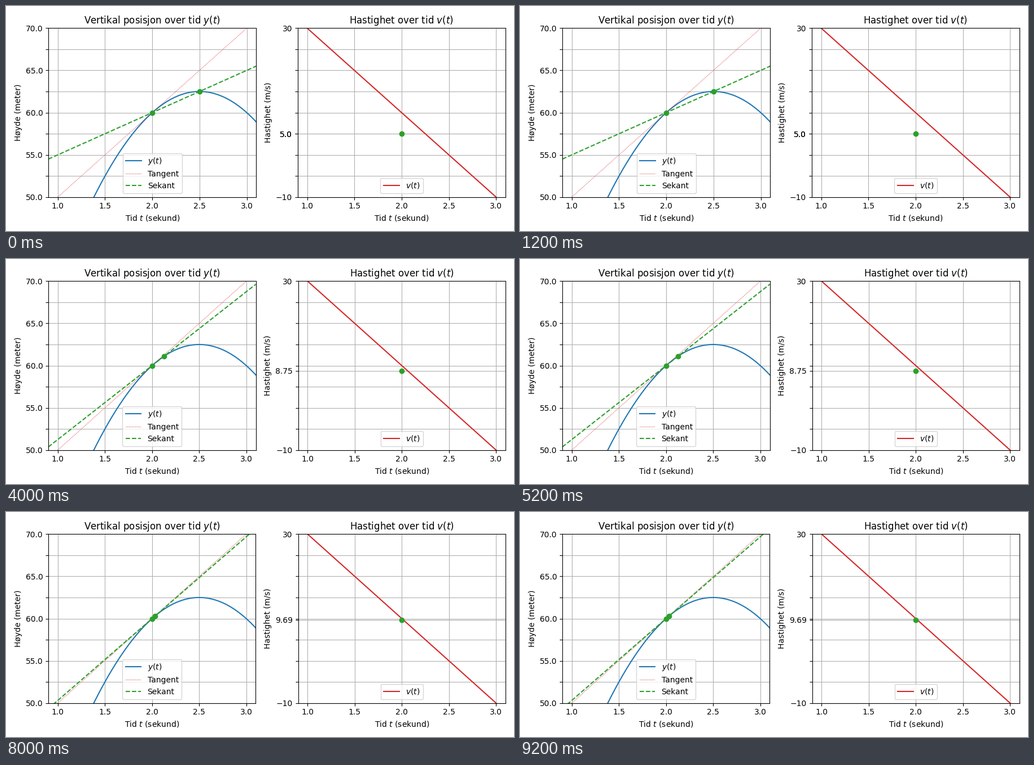
Write a matplotlib script that moves like this. It is 900 px wide and 400 px high and loops after 10 s.

```python
import numpy as np
import matplotlib.pyplot as plt
from matplotlib.animation import FuncAnimation

T0 = 2.0
T_MIN, T_MAX = 0.9, 3.1
V_MIN, V_MAX = -10, 30


def height(t):
    return 50 * t - 10 * t**2


def speed(t):
    return 50 - 20 * t


def setup(ax, title, ylabel, ylim):
    ax.set_title(title)
    ax.set_xlabel("Tid $t$ (sekund)")
    ax.set_ylabel(ylabel)
    ax.set_xlim(T_MIN, T_MAX)
    ax.set_ylim(*ylim)
    ax.set_xticks(np.arange(1, 3.1, 0.5))
    ax.grid(True)


fig, (pos, vel) = plt.subplots(1, 2, figsize=(9, 4), dpi=100)
ends = np.array([T_MIN, T_MAX])
t = np.linspace(T_MIN, T_MAX, 400)

# Position with tangent and secant
setup(pos, "Vertikal posisjon over tid $y(t)$", "Høyde (meter)", (50, 70))
y_ticks = np.arange(50, 70.1, 2.5)
pos.set_yticks(y_ticks, [f"{y:.1f}" if y % 5 == 0 else "" for y in y_ticks])
pos.plot(t, height(t), color="tab:blue", label="$y(t)$")
pos.plot(ends, height(T0) + speed(T0) * (ends - T0), ":", color="tab:red",
         lw=0.75, label="Tangent")
secant, = pos.plot([], [], "--", color="tab:green", label="Sekant")
points, = pos.plot([], [], "o", color="tab:green")
pos.legend(loc="lower center")

# Velocity
setup(vel, "Hastighet over tid $v(t)$", "Hastighet (m/s)", (V_MIN, V_MAX))
vel.plot(t, speed(t), color="tab:red", label="$v(t)$")
mean_dot, = vel.plot([], [], "o", color="tab:green")
vel.legend(loc="lower center")


def update(i):
    h = 0.5 / 2**i
    slope = (height(T0 + h) - height(T0)) / h
    secant.set_data(ends, height(T0) + slope * (ends - T0))
    points.set_data([T0, T0 + h], [height(T0), height(T0 + h)])
    mean_dot.set_data([T0], [slope])

    marks = {V_MIN: str(V_MIN).replace("-", "\u2212"), V_MAX: str(V_MAX),
             slope: str(round(slope, 2))}
    ticks = [*range(V_MIN, V_MAX + 1, 5), slope]
    vel.set_yticks(ticks, [marks.get(v, "") for v in ticks])
    fig.tight_layout()
    return secant, points, mean_dot


anim = FuncAnimation(fig, update, frames=5, interval=2000, repeat=True,
                     repeat_delay=0, blit=False)
plt.show()
```
